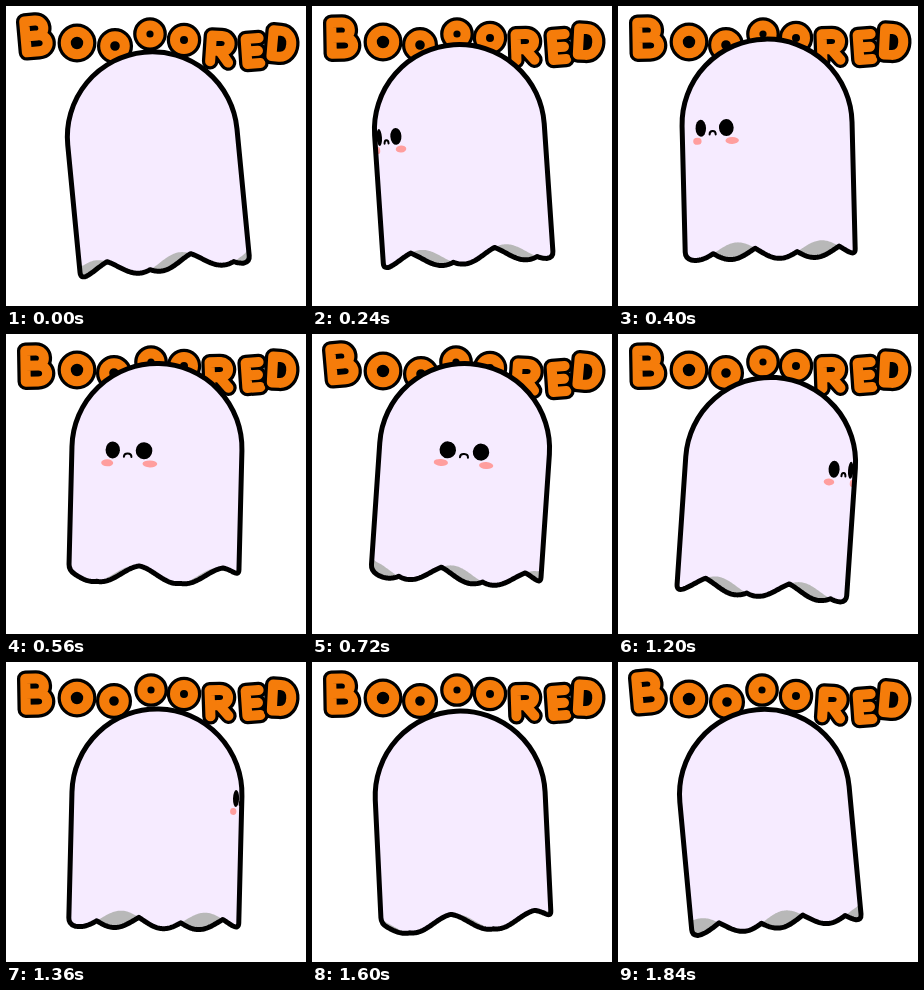
Write an HTML page that moves like this. It is 300 px wide and 300 px high and loops after 1920 ms.

```html
<!DOCTYPE html>
<html lang="en">
<head>
<meta charset="utf-8">
<title>Boooored ghost</title>
<style>
  html, body { margin: 0; width: 100%; height: 100%; overflow: hidden; background: #fff; }
  svg { display: block; width: 100vw; height: 100vh; }
  #word path { stroke-linejoin: round; stroke-linecap: round; }
  .edge { fill: #000; stroke: #000; stroke-width: 16.5; }
  .ink { fill: none; stroke: #f57c0a; stroke-width: 10; }
  #inside { fill: #b8b8b8; }
  #front { fill: #f6ebff; }
  #outline { fill: none; stroke: #000; stroke-width: 5; stroke-linejoin: round; }
  .cheek { fill: #ff9e9e; }
  #mouth { fill: none; stroke: #000; stroke-width: 2; stroke-linecap: round; }
</style>
</head>
<body>
<svg viewBox="0 0 300 300">
  <defs><clipPath id="body"><path id="mask"/></clipPath></defs>
  <g id="word" role="img" aria-label="BOOOORED"></g>
  <g id="ghost">
    <path id="inside"/>
    <path id="front"/>
    <g id="face" clip-path="url(#body)">
      <ellipse class="cheek" data-turn="-15.5" cy="100.5" rx="7.4" ry="3.5"/>
      <ellipse class="cheek" data-turn="15.5" cy="100.5" rx="7.4" ry="3.5"/>
      <ellipse data-turn="-11.3" cy="87.5" rx="8.4" ry="8.5"/>
      <ellipse data-turn="11.3" cy="87.5" rx="8.4" ry="8.5"/>
      <path id="mouth"/>
    </g>
    <path id="outline"/>
  </g>
</svg>
<script>
const LOOP = 1920, STEP = 80, TAU = Math.PI * 2, RAD = Math.PI / 180;
const R = 85, HEM = 211, WAVE = 8.5, PERIOD = 84, CORNER = 6;
const $ = id => document.getElementById(id);

// centre lines of the chunky hand-drawn letters
const ring = r => `M${-r} 0A${r} ${r} 0 0 1 ${r} 0A${r} ${r} 0 0 1 ${-r} 0Z`;
const B = 'M-10.5 -15.5V15.5H2C14 15.5 14 -.5 2 -.5H-10.5H1C10.5 -.5 10.5 -15.5 0 -15.5Z';
const P = 'M-9 13V-13H1C12 -13 12 2 1 2H-9M0 2L9 13';
const E = 'M6.5 -12.5H-6.5V12.5H6.5M-6.5 0H5';
const D = 'M-9.5 -13V13H-2C13 13 13 -13 -2 -13Z';

// outline, then x, y, angle for each of the two poses
const letters = [
  [B, 30, 30, -5, 30, 32, -1],
  [ring(11.2), 71, 37, 0, 71, 36, 0],
  [ring(9.8), 109, 40, 0, 108, 39, 0],
  [ring(8.6), 144, 28, 0, 145, 28, 0],
  [ring(9), 178, 34, 0, 178, 32, 0],
  [P, 214, 43, 4, 213, 41, -2],
  [E, 247, 45, -4, 247, 41, -4],
  [D, 276, 38, 5, 276, 36, 3]
].map(([d, ...poses]) => {
  const g = document.createElementNS('http://www.w3.org/2000/svg', 'g');
  for (const layer of ['edge', 'ink']) {
    const path = document.createElementNS(g.namespaceURI, 'path');
    path.setAttribute('class', layer);
    path.setAttribute('d', d);
    g.append(path);
  }
  $('word').append(g);
  return { g, poses };
});
const features = [...document.querySelectorAll('#face ellipse')].map(el => ({
  el, turn: +el.dataset.turn, rx: +el.getAttribute('rx')
}));

function shape(hem) {
  const end = R - CORNER, right = hem(R), left = hem(-R);
  let d = `M${-R} ${left - CORNER}V${R}A${R} ${R} 0 0 1 ${R} ${R}`
    + `V${right - CORNER}Q${R} ${right} ${end} ${hem(end)}`;
  for (let x = end; x >= -end; x--) d += `L${x} ${hem(x).toFixed(2)}`;
  return d + `Q${-R} ${left} ${-R} ${left - CORNER}Z`;
}

function drawWord(t) {
  const i = t / STEP;
  const second = (i >= 2 && i < 8) || (i >= 14 && i < 22);
  for (const { g, poses } of letters) {
    const [x, y, angle] = poses.slice(second ? 3 : 0);
    g.setAttribute('transform', `translate(${x} ${y}) rotate(${angle})`);
  }
}

function drawFace(t) {
  const turn = (t - 720) * 0.125;
  $('face').style.display = t >= 80 && t < 1440 ? '' : 'none';
  for (const f of features) {
    const a = (turn + f.turn) * RAD;
    f.el.setAttribute('cx', R * Math.sin(a));
    f.el.setAttribute('rx', Math.max(0, f.rx * Math.cos(a)));
  }
  const x = R * Math.sin(turn * RAD), w = 4 * Math.cos(turn * RAD);
  $('mouth').setAttribute('d', Math.abs(turn) < 85
    ? `M${x - w} 94C${x - w} 89.5 ${x + w} 89.5 ${x + w} 94` : '');
}

function drawGhost(t) {
  const swing = TAU * t / LOOP;
  const d = swing - 121 * RAD;
  const top = 40 - 10 * Math.cos(d) - Math.cos(2 * d);
  const angle = -5.5 * Math.cos(swing);
  $('ghost').setAttribute('transform', `translate(150 ${top}) rotate(${angle} 0 123)`);

  // near and far rims of the hem ripple in opposite directions
  const phase = 2 * swing - Math.PI / 4;
  const rim = side => x => HEM + WAVE * Math.cos(TAU * (x + 15) / PERIOD + side * phase);
  const near = rim(-1), far = rim(1);
  const whole = shape(x => Math.max(near(x), far(x)));
  for (const id of ['inside', 'outline', 'mask']) $(id).setAttribute('d', whole);
  $('front').setAttribute('d', shape(near));
}

const start = performance.now();
function frame() {
  const t = Math.floor((performance.now() - start) % LOOP / STEP) * STEP;
  drawWord(t);
  drawGhost(t);
  drawFace(t);
  requestAnimationFrame(frame);
}
frame();
</script>
</body>
</html>
```
